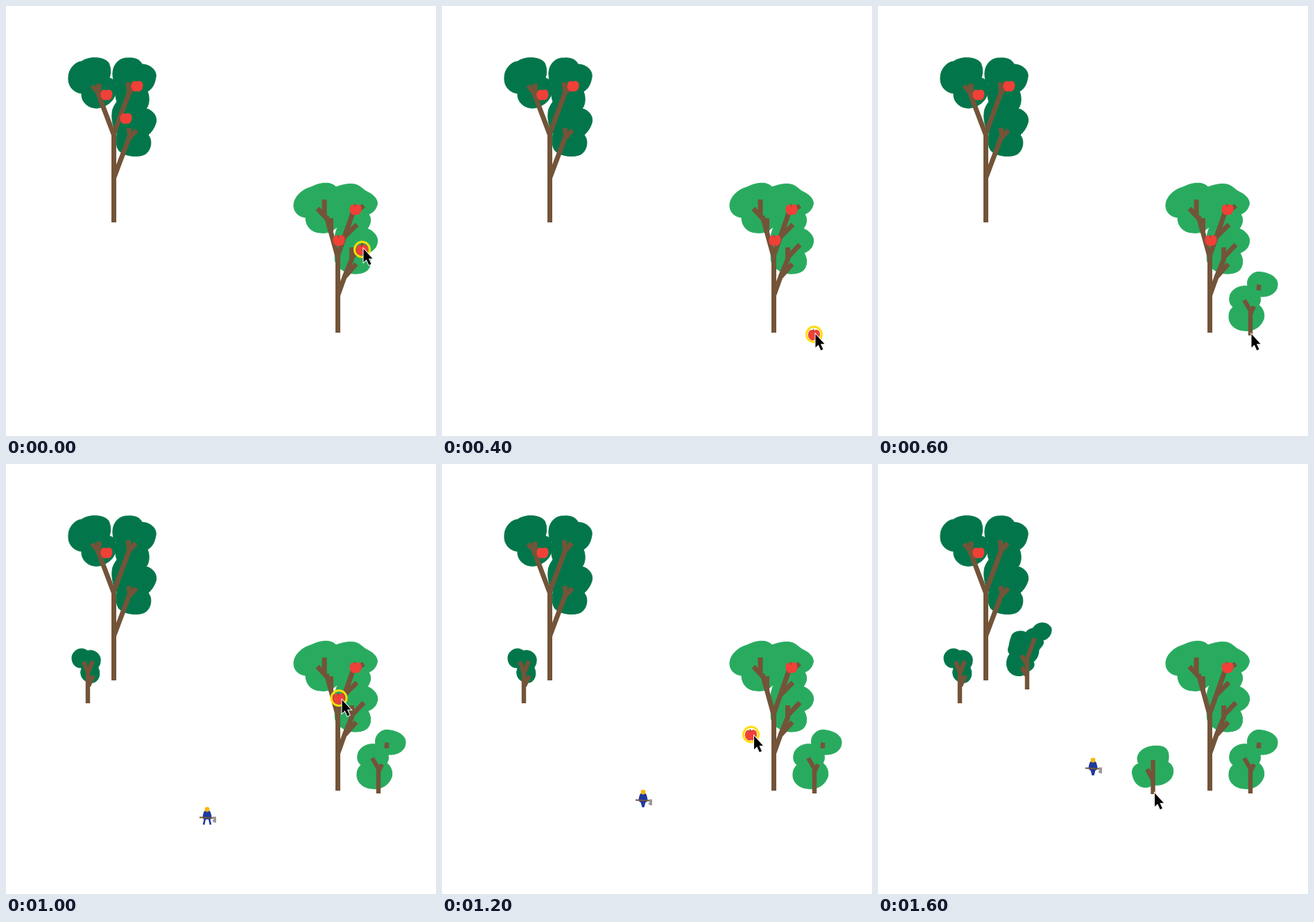
Recreate the animation shown at these times as an HTML page without scripts. Size 620 by 620 pixels, loop 1800 ms.

```html
<!DOCTYPE html>
<html lang="en">
<head>
<meta charset="utf-8">
<title>Apple orchard</title>
<style>
  html, body { margin: 0; width: 100%; height: 100%; overflow: hidden; background: #fff; }
  svg { display: block; width: 100vw; height: 100vh; }
  .dark { fill: #02764a; stroke: #02764a; }
  .light { fill: #29ab5f; stroke: #29ab5f; }
  .wood { fill: none; stroke: #735439; stroke-width: 7; }
  .thin { stroke-width: 6.4; }
</style>
</head>
<body>
<svg viewBox="0 0 620 620">
  <defs>
    <path id="fruit" fill="#f04037" d="M0-6.500C3-8.500 7-7.500 8-4C9.300 0 8 4.500 5.500 6.500C3.500 8.300 1.500 7.500 0 7.500C-2 8.300-4 8-5.500 6.500C-8.500 4-9.300 0-8-3.500C-7-7.500-3-8 0-6.500Z"/>
    <g id="apple">
      <use href="#fruit"/>
      <path d="M-.5-4L-1.200-8.500" stroke="#735439" stroke-width="1.300"/>
    </g>
    <g id="body">
      <path fill="#1f3a9e" d="M-3.500 2H3.500C5.500 4 6 8 6.500 11L5 14.500H-5L-6.500 11C-6 8-5.500 4-3.500 2Z"/>
      <circle r="3.400" fill="#fbb40c"/>
    </g>
    <g id="axe">
      <path d="M-11 11.500L9 12.500" stroke="#735439" stroke-width="2.200"/>
      <path fill="#9b9798" d="M8 10.500H13V19H10L7.500 17L9.500 14Z"/>
    </g>
  </defs>

  <!-- tall dark tree -->
  <path class="dark" d="M90 103C90 90 101 80 109 80C118 73 140 72 148 82C152 91 151 98 149 104C156 104 160 114 158 124C157 135 149 142 138 146C122 151 108 140 109 126C98 125 89 116 90 103Z"/>
  <path class="dark" d="M154 100C153 84 164 74 176 75C186 74 194 78 196 84C208 84 218 93 216 103C214 115 209 121 204 123C208 133 206 144 202 148C212 150 219 160 216 169C213 178 209 182 205 186C212 194 209 209 200 214C190 219 172 216 166 211C160 208 158 200 160 184C155 176 152 165 153 155C153 148 157 142 160 138C157 130 157 122 159 113C156 110 154 106 154 100Z"/>
  <path class="wood" d="M155.500 312V182M155.500 186L130.500 120M124 115L134 126M134 112V126M155 185L179 121M176 110L178 126M177 126L187 114M155.500 248L180 183M177 176L179 190M178 190L188 179"/>
  <use href="#fruit" x="145" y="128"/>
  <use href="#fruit" x="189" y="115.500">
    <animate attributeName="display" calcMode="discrete" dur="1.8s" repeatCount="indefinite" values="inline;inline;inline;inline;inline;none;none;none;none"/>
  </use>
  <use href="#fruit" x="173" y="162">
    <animate attributeName="display" calcMode="discrete" dur="1.8s" repeatCount="indefinite" values="inline;none;none;none;none;none;none;none;none"/>
  </use>

  <!-- tall light tree -->
  <path class="light" d="M415 286C416 274 428 264 440 261C452 255 467 252 476 261C486 257 498 255 506 258C513 261 515 265 521 268C532 273 537 281 535 287C533 295 527 299 523 300C528 308 525 316 521 321C532 325 538 335 535 343C533 351 527 354 522 356C528 366 526 376 521 381C514 388 492 388 484 380C474 375 473 365 475 355L474 336C474 328 477 322 478 318C470 326 462 328 454 327C441 327 432 318 432 305C422 304 414 297 415 286Z"/>
  <path class="wood" d="M478.500 471V354M478 361L462 303M459 279V304M449 292L463 307M468.500 306V328M478 361L503 290M502 298L516 288M488 333L506 315M479 416L489 388L499 364M498.500 348V366M497 364L516 344M489 390L505 372"/>
  <use href="#apple" x="504" y="293.500"/>
  <use href="#apple" x="480" y="338">
    <animate attributeName="display" calcMode="discrete" dur="1.8s" repeatCount="indefinite" values="inline;inline;inline;inline;inline;none;none;none;none"/>
  </use>

  <!-- saplings -->
  <g>
    <path class="light" d="M507 420C508 409 521 402 533 404C530 392 541 382 551 383.500C566 385 577 392 576 402C576 413 565 420 551 419C552 425 551 429 549 431C556 436 559 447 555 454C550 465 538 470 527 468C513 467 505 457 506 447C506 439 511 435 512 434C508 431 506 426 507 420Z"/>
    <path class="wood thin" d="M537 475V440M528 424L538 441M537 444L542 433M546 404L552 405.500M549 404V410"/>
    <animate attributeName="display" calcMode="discrete" dur="1.8s" repeatCount="indefinite" values="none;none;none;inline;inline;inline;inline;inline;inline"/>
  </g>
  <g>
    <path class="dark" d="M95 281C94 270 106 264 113 267C116 268 118 270 119 269C129 267 138 276 136 285C136 290 133 292 133 294C137 302 134 311 129 314C122 318 109 313 108 303C107 298 109 296 109 294C101 294 96 290 95 281Z"/>
    <path class="wood thin" d="M118 345V296M118 300L112 285M119 300L125 284M119 320L126 305"/>
    <animate attributeName="display" calcMode="discrete" dur="1.8s" repeatCount="indefinite" values="none;none;none;none;inline;inline;inline;inline;inline"/>
  </g>
  <g>
    <path class="dark" d="M189 262C190 254 192 250 193 247C195 241 209 239 213 243C217 237 222 238 224 236C229 227 245 226 250 237C251 246 245 253 238 254C240 260 236 263 232 268C232 276 228 283 224 285C227 290 224 297 216 299C212 307 197 308 190 300C184 294 184 281 190 274C187 271 187 266 189 262Z"/>
    <path class="wood thin" d="M215 325V280M214.500 282L226 251M207 276L215 290M207 293L215 306"/>
    <animate attributeName="display" calcMode="discrete" dur="1.8s" repeatCount="indefinite" values="none;none;none;none;none;none;none;inline;inline"/>
  </g>
  <g>
    <path class="light" d="M374 424C375 412 389 406 402 406.500C415 406 420 413 419 424C419 427 418 429 418 430C427 434 428 446 422 454C415 462 403 465 396 462C389 470 372 467 368 452C364 442 368 434 376 432C374 429 374 427 374 424Z"/>
    <path class="wood thin" d="M396.500 476V427M388 440L396 455"/>
    <animate attributeName="display" calcMode="discrete" dur="1.8s" repeatCount="indefinite" values="none;none;none;none;none;none;none;none;inline"/>
  </g>

  <!-- woodcutter -->
  <g transform="translate(-99 0)">
    <animateTransform attributeName="transform" type="translate" calcMode="discrete" dur="1.8s" repeatCount="indefinite" values="-99 0;-99 0;-99 0;-99 0;268.500 531;290 498;290 473;303 452.500;310 427"/>
    <path fill="#1f3a9e" d="M-4 13H4L1.500 22H-1.500Z">
      <animate attributeName="display" calcMode="discrete" dur="1.8s" repeatCount="indefinite" values="inline;inline;inline;inline;inline;none;inline;none;inline"/>
    </path>
    <path fill="none" stroke="#1f3a9e" stroke-width="2.600" d="M-3 13L-5 22M3 13L5 22">
      <animate attributeName="display" calcMode="discrete" dur="1.8s" repeatCount="indefinite" values="none;none;none;none;none;inline;none;inline;none"/>
    </path>
    <use href="#body"/>
    <use href="#axe"/>
  </g>

  <!-- held apple -->
  <g transform="translate(513.5 351)">
    <animateTransform attributeName="transform" type="translate" calcMode="discrete" dur="1.8s" repeatCount="indefinite" values="513.500 351;517 400;536.500 473.500;-99 0;-99 0;480 337.500;445.500 390;394.500 472.500;-99 0"/>
    <use href="#apple" y=".7"/>
    <circle r="11" fill="none" stroke="#ffdd08" stroke-width="3"/>
  </g>

  <!-- pointer -->
  <path stroke="#fff" stroke-width="2" paint-order="stroke" d="M0 0V19.500L4.200 15.500L7.800 23.500L11 22L7.400 14.200H13Z" transform="translate(515.5 350)">
    <animateTransform attributeName="transform" type="translate" calcMode="discrete" dur="1.8s" repeatCount="indefinite" values="515.500 350;519.500 400;538.500 473;538.500 473;484 405;484.500 340;450 392;399 474.500;399 474.500"/>
  </path>
</svg>
</body>
</html>
```
